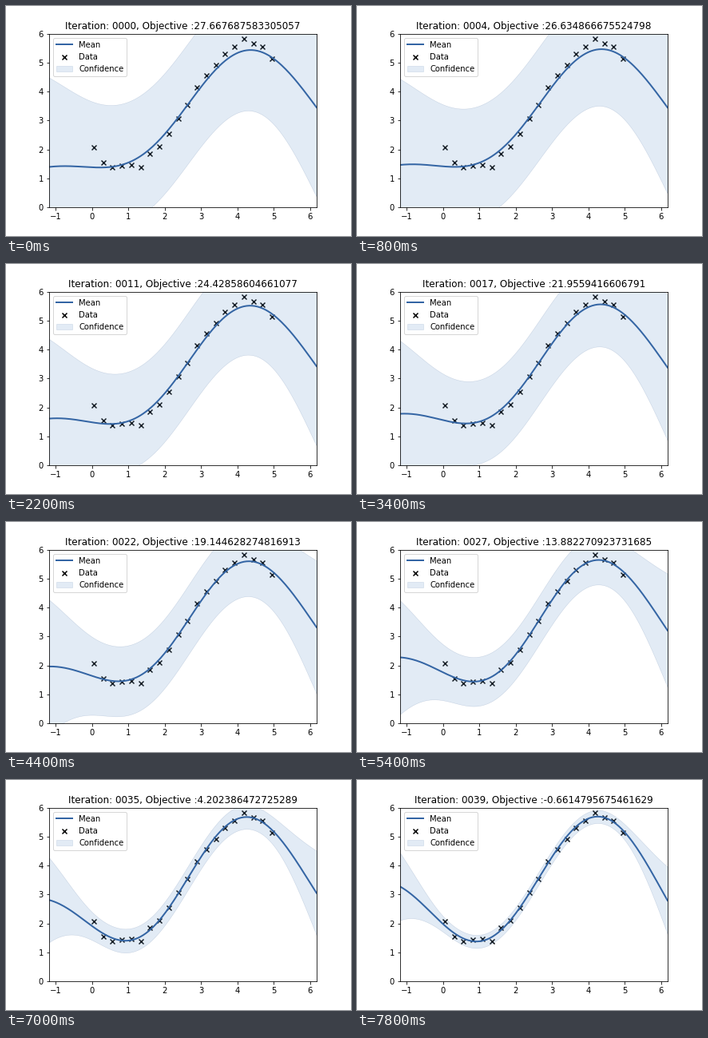
Recreate the animation shown at these times as a matplotlib script. Size 432x288 px, loop 8 s.

```python
import numpy as np
import matplotlib.pyplot as plt
from matplotlib.animation import FuncAnimation

FRAMES, INTERVAL = 40, 200
LEFT, RIGHT = -1.175, 6.175
VARIANCE, LENGTH = 4.0, 2.0

data_x = np.linspace(0.05, 4.95, 20)
data_y = np.array([2.07, 1.55, 1.38, 1.44, 1.47, 1.38, 1.85, 2.10, 2.54, 3.06,
                   3.53, 4.14, 4.55, 4.91, 5.30, 5.55, 5.82, 5.66, 5.55, 5.14])
xs = np.linspace(LEFT, RIGHT, 200)

# Key values of the falling objective
steps = np.array([0, 7, 11, 17, 22, 31, 39])
scores = np.array([27.667687583305057, 25.75147534733545, 24.42858604661077,
                   21.9559416606791, 19.144628274816913, 8.940956899778193,
                   -0.6614795675461629])
slopes = np.gradient(scores, steps, edge_order=2)


def kernel(a, b):
    return VARIANCE * np.exp(-0.5 * ((a[:, None] - b) / LENGTH) ** 2)


gram, cross = kernel(data_x, data_x), kernel(xs, data_x)


def covariance(noise):
    return gram + noise * np.eye(len(data_x))


def neg_log_likelihood(noise):
    cov = covariance(noise)
    return 0.5 * (data_y @ np.linalg.solve(cov, data_y)
                  + np.linalg.slogdet(cov)[1]
                  + len(data_x) * np.log(2 * np.pi))


def predict(noise):
    """Mean of the Gaussian process and half-width of its 95% band."""
    weights = np.linalg.solve(covariance(noise), cross.T)
    var = VARIANCE - np.sum(cross.T * weights, axis=0) + noise
    return data_y @ weights, 1.96 * np.sqrt(var)


def objective(step):
    """Cubic Hermite curve through the key values."""
    i = min(np.searchsorted(steps, step, side="right") - 1, len(steps) - 2)
    gap = steps[i + 1] - steps[i]
    u = (step - steps[i]) / gap
    rise = 3 * u**2 - 2 * u**3
    return float((1 - rise) * scores[i] + rise * scores[i + 1]
                 + gap * (u - 2 * u**2 + u**3) * slopes[i]
                 + gap * (u**3 - u**2) * slopes[i + 1])


# The noise level follows from the objective by inverting the likelihood
log_noise = np.linspace(np.log(1.05), np.log(0.005), 150)
likelihood = np.minimum.accumulate(
    [neg_log_likelihood(n) for n in np.exp(log_noise)])


def noise_at(step):
    return np.exp(np.interp(objective(step), likelihood[::-1],
                            log_noise[::-1]))


fig, ax = plt.subplots(figsize=(6, 4), dpi=72)
fig.subplots_adjust(left=0.125, right=0.9, bottom=0.125, top=0.88)

mean, half = predict(noise_at(0))
dots = ax.scatter(data_x, data_y, marker="x", color="k", lw=1.5, label="Data")
band = ax.fill_between(xs, mean - half, mean + half, facecolor="#729fcf",
                       edgecolor="#204a87", linewidth=0.5, alpha=0.2,
                       label="Confidence")
line, = ax.plot(xs, mean, color="#3465a4", linewidth=2, label="Mean")
title = ax.set_title("")
ax.set(xlim=(LEFT, RIGHT), ylim=(0, 6), xticks=range(-1, 7), yticks=range(7))
ax.legend(handles=[line, dots, band], loc="upper left")


def update(step):
    mean, half = predict(noise_at(step))
    line.set_ydata(mean)
    upper = np.column_stack([xs, mean + half])
    lower = np.column_stack([xs, mean - half])
    band.set_verts([np.vstack([lower, upper[::-1]])])
    title.set_text(f"Iteration: {step:04d}, Objective :{objective(step)}")
    return line, band, title


anim = FuncAnimation(fig, update, frames=FRAMES, interval=INTERVAL,
                     init_func=lambda: update(0), repeat=True, repeat_delay=0)
plt.show()
```
